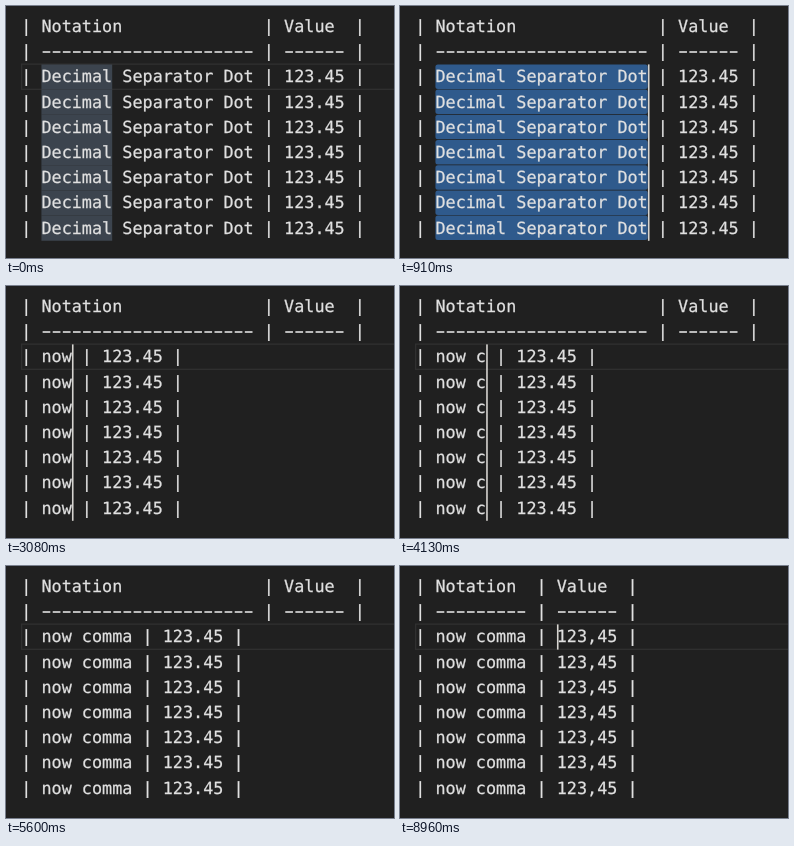
Recreate the animation shown at these times as an HTML page with a canvas. Size 388 px wide and 252 px high, loop 9.45 s.

```html
<!DOCTYPE html>
<html lang="en">
<head>
<meta charset="utf-8">
<title>Column editing</title>
<style>
  html, body { margin: 0; width: 100%; height: 100%; overflow: hidden; background: #202020; }
  canvas { display: block; }
</style>
</head>
<body>
<canvas id="stage" width="388" height="252"></canvas>
<script>
const ctx = document.getElementById("stage").getContext("2d");
const LOOP = 9450, LEFT = 15.2, TOP = 8, CHAR = 10.11, LINE = 25.2;
const FIRST = 2, ROWS = 7;
const color = {
  back: "#202020", text: "#e0e0e0", line: "#303030", cursor: "#d6d4d0",
  word: "#3c444e", match: "#42464b", selection: "#2f5a8c"
};
const colX = col => LEFT + col * CHAR;
const rowY = row => TOP + row * LINE;

// Each entry changes part of the editor state; the rest carries over.
const steps = [
  [0, { name: "Decimal Separator Dot", value: "123.45", header: 21, word: [2, 9],
        sel: null, cursor: 2, on: false, cursors: ROWS }],
  [210, { word: null, on: true }],
  [980, { sel: [2, 24], cursor: 24 }],
  [1400, { sel: [2, 23], cursor: 23 }],
  [1890, { on: false }],
  [2380, { on: true }],
  [2660, { name: "n", cursor: 3, sel: null }],
  [2870, { name: "no", cursor: 4 }],
  [3080, { name: "now", cursor: 5 }],
  [3570, { on: false }],
  [3640, { name: "now ", cursor: 6, on: true }],
  [4130, { name: "now c", cursor: 7 }],
  [4480, { name: "now co", cursor: 8 }],
  [4830, { name: "now com", cursor: 9 }],
  [4970, { name: "now comm", cursor: 10 }],
  [5110, { name: "now comma", cursor: 11 }],
  [5600, { on: false }],
  [6160, { on: true }],
  [6440, { cursor: 13 }],
  [6580, { cursor: 17 }],
  [6860, { word: [14, 20] }],
  [7070, { word: null, sel: [17, 18], cursor: 18 }],
  [7630, { on: false }],
  [8120, { value: "123,45", sel: null, on: true }],
  [8680, { on: false }],
  [8960, { header: 9, cursor: 14, cursors: 1, on: true }]
];

function stateAt(time) {
  const state = {};
  for (const [start, change] of steps) if (time >= start) Object.assign(state, change);
  if (time >= 210 && time < 980) {
    const tick = Math.floor((time - 210) / 70) + 1;
    const chars = Math.round(22 * (1 - (1 - tick / 12) ** 1.3));
    state.sel = [2, 2 + chars];
    state.cursor = 2 + chars;
    state.cursors = Math.min(tick, ROWS);
  }
  return state;
}

function drawText(text, row) {
  const y = rowY(row) + 18;
  [...text].forEach((char, col) => {
    const x = colX(col);
    if (char === "-") {
      ctx.fillRect(x + 1.2, y - 6, 7.7, 1.6);
    } else if (char !== " ") {
      ctx.fillText(char, x, y);
      ctx.strokeText(char, x, y);
    }
  });
}

function drawRange([from, to], row, fill, radius = 0) {
  const gap = radius ? 0.7 : 0;
  ctx.fillStyle = fill;
  ctx.beginPath();
  ctx.roundRect(colX(from), rowY(row), (to - from) * CHAR, LINE - gap, radius);
  ctx.fill();
}

function draw(time) {
  const s = stateAt(time);
  ctx.fillStyle = color.back;
  ctx.fillRect(0, 0, 388, 252);

  if (!s.sel) {
    ctx.strokeStyle = color.line;
    ctx.lineWidth = 1.3;
    ctx.strokeRect(LEFT + 0.4, rowY(FIRST) - 0.3, 400, LINE);
  }
  for (let i = 0; i < ROWS; i++) {
    if (s.word) drawRange(s.word, FIRST + i, color.word);
    if (s.sel) drawRange(s.sel, FIRST + i, i < s.cursors ? color.selection : color.match, 2.5);
  }

  ctx.fillStyle = ctx.strokeStyle = color.text;
  ctx.lineWidth = 0.25;
  ctx.font = "16.8px 'DejaVu Sans Mono', monospace";
  ctx.textRendering = "geometricPrecision";
  drawText(`| ${"Notation".padEnd(s.header)} | Value  |`, 0);
  drawText(`| ${"-".repeat(s.header)} | ------ |`, 1);
  for (let i = 0; i < ROWS; i++) drawText(`| ${s.name} | ${s.value} |`, FIRST + i);

  if (s.on) {
    ctx.fillStyle = color.cursor;
    ctx.fillRect(colX(s.cursor) + 0.2, rowY(FIRST), 1.6, s.cursors * LINE);
  }
}

function frame() {
  draw(performance.now() % LOOP);
  requestAnimationFrame(frame);
}
frame();
</script>
</body>
</html>
```
